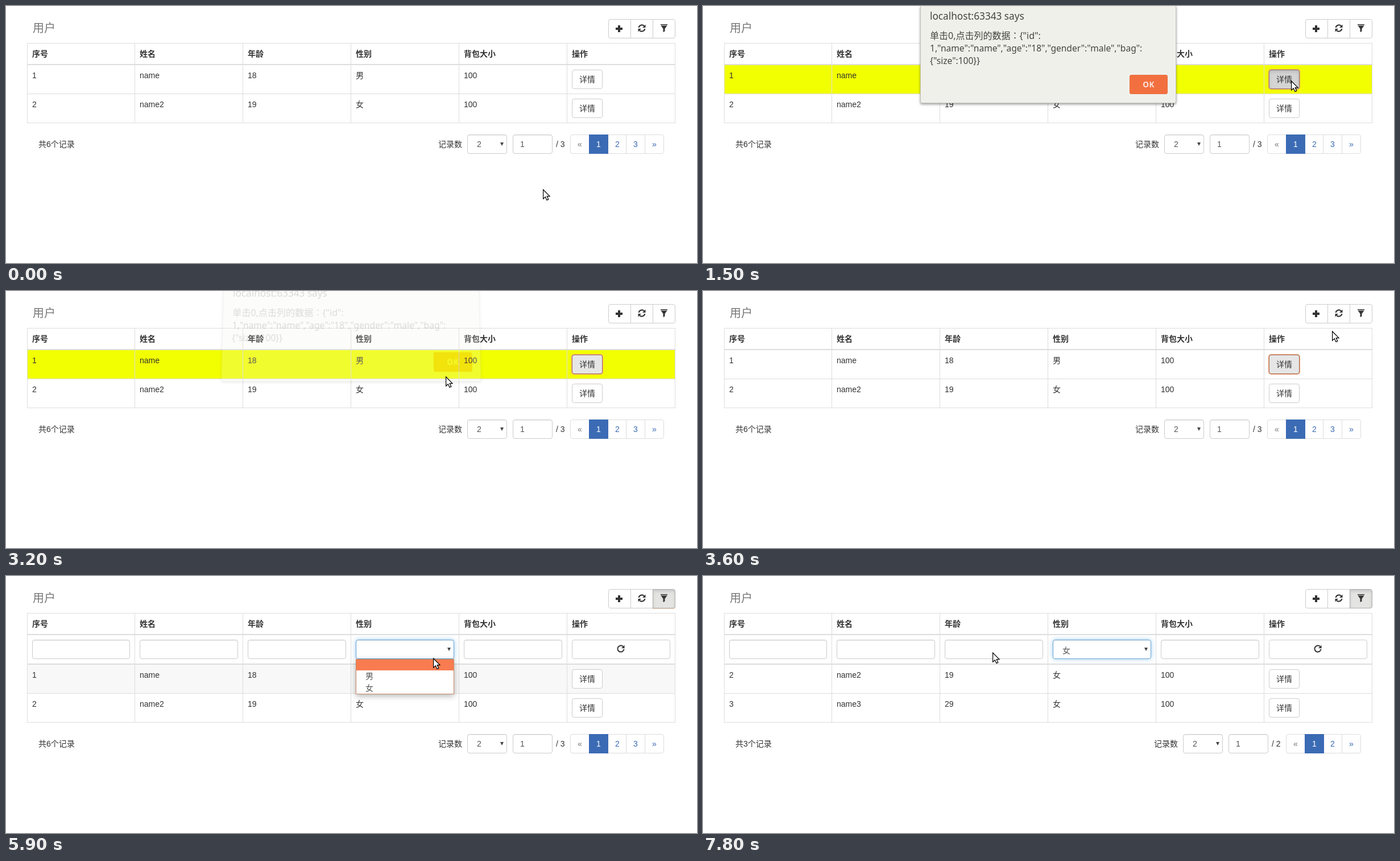
Recreate the animation shown at these times as an HTML page. Size 1215 by 452 pixels, loop 8 s.

```html
<!DOCTYPE html>
<html lang="zh-CN">
<head>
<meta charset="utf-8">
<title>用户</title>
<style>
  html, body { margin: 0; width: 100%; height: 100%; overflow: hidden; background: #fff; }
  body { position: relative; color: #333; font: 14px/20px "Liberation Sans", "Noto Sans CJK SC", sans-serif; }
  div, svg { position: absolute; box-sizing: border-box; white-space: pre; }
  svg { overflow: visible; fill: #333; }
  .line { background: #ddd; }
  .hover { background: #f2ff00; }
  .stripe { background: #f8f8f8; }
  .bold { font-weight: bold; }
  .title { font-size: 20px; color: #777; }
  .btn, .field, .page { border: 1px solid #ccc; background: #fff; line-height: 32px; }
  .btn { border-radius: 4px; text-align: center; }
  .btn.over { background: #e6e6e6; border-color: #adadad; }
  .btn.focus { background: #e6e6e6; border-color: #a8705a; box-shadow: 0 0 0 1px #f0a078; }
  .btn.down { background: #d4d4d4; border-color: #9a7c6c; box-shadow: inset 0 3px 5px rgba(0,0,0,.125), 0 0 0 1px #e8a070; }
  .btn.on { background: #e4e4e2; border-color: #adadad; box-shadow: inset 0 3px 5px rgba(0,0,0,.125); }
  .btn.on.ring { box-shadow: inset 0 3px 5px rgba(0,0,0,.125), 0 0 0 1px #f0a078; }
  .btn.on.under { box-shadow: inset 0 3px 5px rgba(0,0,0,.125), 0 1px 0 #f3cdb8; }
  .left { border-radius: 4px 0 0 4px; }
  .mid { border-radius: 0; }
  .right { border-radius: 0 4px 4px 0; }
  .field { border-radius: 4px; padding-left: 12px; color: #555; box-shadow: inset 0 1px 1px rgba(0,0,0,.075); }
  .select { padding-left: 16px; }
  .select.low { line-height: 36px; }
  .select.glow { border-color: #66a3d2; box-shadow: inset 0 1px 1px rgba(0,0,0,.075), 0 0 8px rgba(102,175,233,.6); }
  .arrow { border: 3px solid transparent; border-top: 6px solid #444; border-bottom: 0; }
  .page { border-color: #ddd; text-align: center; color: #3b6bb4; }
  .page.off { color: #777; }
  .page.now { color: #fff; background: #3b6bb4; border-color: #3b6bb4; }
  .menu { background: #fff; border: 1px solid #c88a66; color: #555; box-shadow: 0 3px 10px rgba(0,0,0,.3); }
  .pick { background: #f87c50; color: #fff; }
  .dialog { background: #f0f0eb; border: 1px solid #c4c4be; border-top: 0; border-radius: 0 0 3px 3px; color: #45453f;
    box-shadow: 0 2px 4px rgba(0,0,0,.4); font: 15.55px/22px "Noto Sans", "Noto Sans CJK JP", sans-serif; transform-origin: 50% 20px; }
  .says { font-size: 17.2px; }
  .first { font-size: 16px; }
  .ok { background: #f2703f; border: 1px solid #e8703f; border-radius: 3px; color: #f9e4da; text-align: center;
    font: bold 13.5px/32px "Noto Sans", sans-serif; letter-spacing: .5px; }
  .ok.lit { background: #f67f52; }
  .ok.press { background: #d95f31; }
</style>
</head>
<body>
<script>
const COLS = [37, 226, 416, 606, 796, 986, 1176];
const HEADS = ['序号', '姓名', '年龄', '性别', '背包大小', '操作'];
const ALL = [[1, 'name', 18, '男', 100], [2, 'name2', 19, '女', 100]];
const WOMEN = [[2, 'name2', 19, '女', 100], [3, 'name3', 29, '女', 100]];

// Pointer stops: time, x, y
const PATH = [
  [200, 944, 322], [800, 1036, 125], [900, 1036, 125], [1000, 1034, 131], [1700, 1034, 131],
  [1900, 896, 150], [2000, 896, 150], [2400, 773, 150], [3300, 773, 150], [3600, 1106, 70],
  [3700, 1106, 70], [4000, 1174, 32], [4600, 1174, 32], [5000, 967, 75], [5100, 967, 75],
  [5400, 760, 137], [5800, 760, 137], [6300, 672, 204], [7200, 672, 204], [7800, 509, 134]
];

function pointer(t) {
  const next = PATH.findIndex(p => p[0] > t);
  if (next === 0) return PATH[0].slice(1);
  if (next < 0) return PATH[PATH.length - 1].slice(1);
  const [a, b] = [PATH[next - 1], PATH[next]];
  const k = (t - a[0]) / (b[0] - a[0]);
  const ease = k * k * (3 - 2 * k);
  return [1, 2].map(i => Math.round(a[i] + (b[i] - a[i]) * ease));
}

const box = (x, y, w, h, cls, body = '', style = '') =>
  `<div class="${cls}" style="left:${x}px;top:${y}px;width:${w}px;height:${h}px;${style}">${body}</div>`;
const text = (x, mid, body, cls = '') =>
  `<div class="${cls}" style="left:${x}px;top:${mid - 10}px">${body}</div>`;
const svg = (x, y, body) =>
  `<svg width="14" height="14" style="left:${x}px;top:${y}px">${body}</svg>`;
const arrow = (x, y) => box(x, y, 6, 6, 'arrow');

const half = '<path d="M1.6 6A5.6 5.6 0 0 1 11 3" fill="none" stroke="#333" stroke-width="2"/><path d="M13.5 .5V6H8Z"/>';
const ICONS = {
  plus: '<path d="M5 1h4v4h4v4H9v4H5V9H1V5h4Z"/>',
  refresh: half + `<g transform="rotate(180 7 7)">${half}</g>`,
  filter: '<path d="M1 0h12v1.5H1ZM1.5 2.5h11L8.5 8v4.5L5.5 14V8Z"/>',
  repeat: '<path d="M11 3A5.6 5.6 0 1 0 12.6 7.5" fill="none" stroke="#333" stroke-width="2"/><path d="M13.5 .5V6H8Z"/>'
};

const inside = ([px, py], x, y, w, h) => px >= x && px < x + w && py >= y && py < y + h;

function toolbar(t, mouse) {
  let state = '';
  if (t >= 5600) state = t < 6900 ? 'on under' : 'on';
  else if (t >= 4300) state = 'on ring';
  else if (inside(mouse, 1137, 23, 40, 34)) state = 'over';
  return text(47, 39, '用户', 'title')
    + box(1059, 23, 40, 34, 'btn left') + box(1098, 23, 40, 34, 'btn mid')
    + box(1137, 23, 40, 34, 'btn right ' + state)
    + svg(1071, 33, ICONS.plus) + svg(1111, 32, ICONS.refresh) + svg(1150, 32, ICONS.filter);
}

function detailButton(t, mouse, y, row) {
  let state = '';
  if (row === 0 && t >= 1300 && t < 4300) state = t < 2900 ? 'down' : 'focus';
  else if (t < 4700 && inside(mouse, 995, y, 54, 34)) state = 'over';
  return box(995, y, 54, 34, 'btn ' + state, '详情');
}

function table(t, mouse, filtering, rows) {
  const top = filtering ? 156 : 104;
  const frozen = t >= 1500 && t < 3300;
  const menuOpen = t >= 5600 && t < 6900;
  let out = '';
  rows.forEach((row, i) => {
    const y = top + i * 51;
    const hovered = frozen ? i === 0 : !menuOpen && inside(mouse, 38, y - 1, 1138, 51);
    if (hovered) out += box(38, y, 1138, 50, 'hover');
    else if (i === 0 && filtering && t < 6900) out += box(38, y, 1138, 50, 'stripe');
  });
  const bottom = top + 101;
  out += COLS.map(x => box(x, 65, 1, bottom - 64, 'line')).join('');
  const rules = [[65, 1], [102, 2], [top + 50, 1], [bottom, 1]];
  if (filtering) rules.push([154, 2]);
  out += rules.map(([y, h]) => box(37, y, 1140, h, 'line')).join('');
  out += HEADS.map((h, i) => text(COLS[i] + 9, 84, h, 'bold')).join('');
  rows.forEach((row, i) => {
    const y = top + i * 51 + 8;
    out += row.map((v, c) => text(COLS[c] + 9, y + 10, v)).join('') + detailButton(t, mouse, y, i);
  });
  return out;
}

function filters(t) {
  const glow = t >= 5600 ? ' glow' : '';
  return COLS.slice(0, 6).map((x, i) => {
    const w = COLS[i + 1] - x - 17;
    if (i === 3) return box(x + 9, 112, w, 34, 'field select low' + glow, t >= 6900 ? '女' : '') + arrow(776, 126);
    if (i === 5) return box(x + 9, 112, w, 34, 'btn') + svg(1074, 121, ICONS.repeat);
    return box(x + 9, 112, w, 34, 'field');
  }).join('');
}

function footer(y, total, pages) {
  const left = 992 + (3 - pages) * 32.8;
  const shift = Math.round(left) - 992;
  const labels = ['«', ...Array.from({ length: pages }, (_, i) => i + 1), '»'];
  const cells = labels.map((label, i) => {
    const edge = i === 0 ? ' off left' : i === 1 ? ' now' : i > pages ? ' right' : '';
    return [i, box(Math.round(left + i * 32.8), y, 34, 34, 'page' + edge, label)];
  });
  cells.sort((a, b) => (a[0] === 1) - (b[0] === 1));
  return text(57, y + 17, `共${total}个记录`) + text(760 + shift, y + 17, '记录数')
    + box(811 + shift, y, 70, 34, 'field select', 2) + arrow(869 + shift, y + 14)
    + box(891 + shift, y, 70, 34, 'field', 1) + text(967 + shift, y + 17, '/ ' + pages)
    + cells.map(c => c[1]).join('');
}

function menu(mouse) {
  const pick = mouse[1] < 165 ? 0 : mouse[1] < 187 ? 1 : 2;
  const tops = [0, 19, 40, 60];
  const items = ['', '男', '女'].map((s, i) =>
    box(0, tops[i], 171, tops[i + 1] - tops[i], i === pick ? 'pick' : '', s, 'padding-left:16px;line-height:21px'));
  return box(615, 146, 173, 62, 'menu', items.join(''));
}

function dialog(t, mouse) {
  const fade = Math.max(0, Math.min(1, (t - 2900) / 300));
  const alpha = t >= 3300 ? .05 : 1 - .8 * fade;
  const drop = t >= 1800 ? 1 : 0;
  const move = `opacity:${alpha};transform:translateY(${drop - 15 * fade}px) perspective(1000px) rotateX(${6 * fade}deg)`;
  const okState = t === 2800 ? ' press' : inside(mouse, 750, 122, 66, 34) && t < 3000 ? ' lit' : '';
  const line = (mid, s, cls = '') => `<div class="${cls}" style="left:16px;top:${mid - 11}px">${s}</div>`;
  const body = line(18, 'localhost:63343 says', 'says')
    + line(52, '单击0,点击列的数据：{"id":', 'first')
    + line(74, '1,"name":"name","age":"18","gender":"male","bag":')
    + line(96, '{"size":100}}')
    + box(367, 121, 67, 34, 'ok' + okState, 'OK');
  return box(382, 0, 450, 171, 'dialog', body, move).replace('<div', '<div lang="ja"');
}

const cursor = ([x, y]) => `<svg width="13" height="20" style="left:${x}px;top:${y}px">
  <path d="M.6 1V17.2L4.3 13.7L7 19.4L9.8 18.2L7.2 12.6H12Z" fill="#fff" stroke="#000" stroke-width="1.2"/></svg>`;

function scene(t) {
  const mouse = pointer(t);
  const filtering = t >= 4700;
  const chosen = t >= 6900;
  return toolbar(t, mouse)
    + table(t, mouse, filtering, chosen ? WOMEN : ALL)
    + (filtering ? filters(t) : '')
    + footer(filtering ? 278 : 226, chosen ? 3 : 6, chosen ? 2 : 3)
    + (t >= 5600 && t < 6900 ? menu(mouse) : '')
    + (t >= 1500 && t < 3400 ? dialog(t, mouse) : '')
    + cursor(mouse);
}

const stage = document.body;
const start = performance.now();
let shown = -1;
function tick() {
  const t = Math.floor((performance.now() - start) % 8000 / 100) * 100;
  if (t !== shown) stage.innerHTML = scene(shown = t);
  requestAnimationFrame(tick);
}
tick();
</script>
</body>
</html>
```
